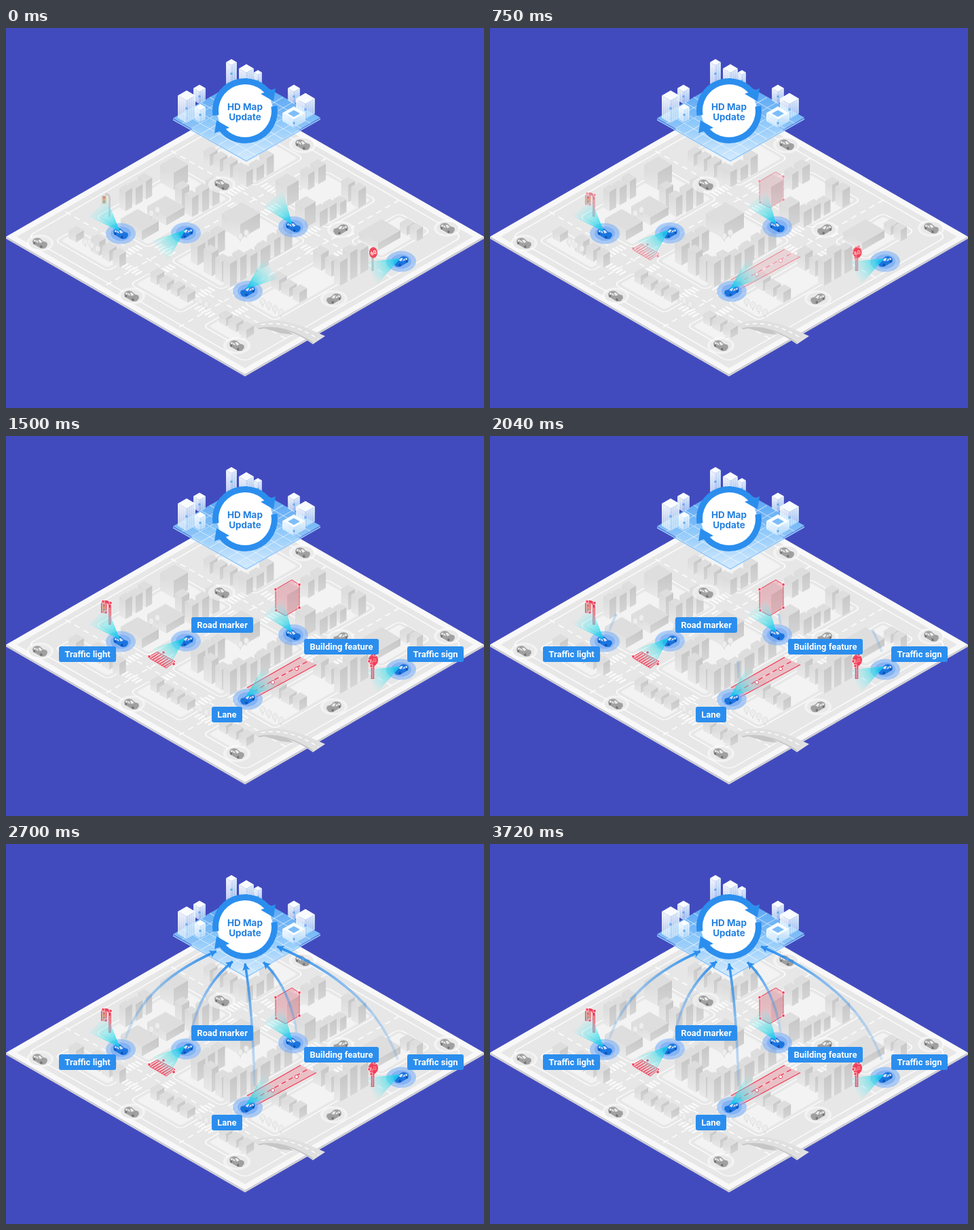
Recreate the animation shown at these times as an HTML page. Size 704x560 px, loop 3750 ms.

```html
<!DOCTYPE html>
<html lang="en">
<head>
<meta charset="utf-8">
<title>HD Map Update</title>
<style>
html, body { margin: 0; width: 100%; height: 100%; overflow: hidden; background: #424bbe; }
svg { display: block; width: 100%; height: 100%; }
.label { font: 600 13px Roboto, sans-serif; fill: #fff; text-anchor: middle; }
.title { font: 700 13.5px Inter, sans-serif; fill: #2580e0; text-anchor: middle; }
.limit { font: 700 8px Roboto, sans-serif; fill: #fff; text-anchor: middle; }
</style>
</head>
<body>
<svg id="stage" viewBox="0 0 704 560" xmlns="http://www.w3.org/2000/svg"></svg>
<script>
const LOOP = 3750;
const RED = '#f23a55';
const BLUE = '#2b8eee';
const ISO = 203 / 352;
const CONCRETE = ['#dedede', 'url(#left)', 'url(#right)'];
const GLASS = ['#f8fcff', 'url(#glassLeft)', 'url(#glassRight)'];
const UP = -1, DOWN = 1;

// Each sensing car: place, facing, view angle, upload curve and what it reports
const sensors = [
  { x: 169, y: 303, face: -1, view: 227, from: [176, 287], to: [310, 158], text: 'Traffic light', box: [78, 310, 84] },
  { x: 265, y: 302, face: 1, view: 140, from: [271, 287], to: [334, 173], text: 'Road marker', box: [273, 267, 91] },
  { x: 423, y: 293, face: -1, view: 233, from: [428, 278], to: [379, 174], text: 'Building feature', box: [439, 299, 110] },
  { x: 582, y: 344, face: 1, view: 153, from: [577, 318], to: [399, 151], text: 'Traffic sign', box: [591, 310, 83] },
  { x: 356, y: 388, face: 1, view: -39, from: [366, 357], to: [352, 176], text: 'Lane', box: [303, 399, 45] }
];

let seed = 7;
const random = (min, max) => {
  seed = (seed * 16807) % 2147483647;
  return min + (max - min) * seed / 2147483647;
};
const times = (n, fn) => Array.from({ length: n }, (_, i) => fn(i));
const draw = list => list.join('');
const polar = (r, deg) => [r * Math.cos(deg * Math.PI / 180), r * Math.sin(deg * Math.PI / 180)];

const poly = (points, attrs) => `<polygon points="${points}" ${attrs}/>`;
const path = (d, attrs) => `<path d="${d}" ${attrs}/>`;
const rect = (x, y, w, h, attrs) => `<rect x="${x}" y="${y}" width="${w}" height="${h}" ${attrs}/>`;
const oval = (x, y, rx, ry, attrs) => `<ellipse cx="${x}" cy="${y}" rx="${rx}" ry="${ry}" ${attrs}/>`;
const stop = (at, color, alpha = 1) => `<stop offset="${at}" stop-color="${color}" stop-opacity="${alpha}"/>`;
const fade = (id, ...list) => `<linearGradient id="${id}" x2="0" y2="1">${draw(list)}</linearGradient>`;

// Box given by its front bottom corner, left depth, right depth and height
function box(x, y, w, d, h, [top, left, right] = CONCRETE) {
  const l = y - w * ISO, r = y - d * ISO;
  return poly([x, y, x - w, l, x - w, l - h, x, y - h], `fill="${left}"`) +
    poly([x, y, x + d, r, x + d, r - h, x, y - h], `fill="${right}"`) +
    poly([x, y - h, x - w, l - h, x - w + d, l - d * ISO - h, x + d, r - h], `fill="${top}"`);
}

// Streets and blocks on a flat 400 x 400 square, tilted into place
function ground() {
  const line = 'fill="none" stroke="#fafafa" stroke-width="1.8"';
  const dash = `${line} stroke-dasharray="8 7"`;
  const zebra = 'fill="none" stroke="#fafafa" stroke-width="11" stroke-dasharray="3 2.6"';
  const spans = [[52, 130], [178, 252], [300, 342]];
  const rows = [[40, 64], [108, 240], [286, 358]];
  let s = rect(0, 0, 400, 400, 'fill="#f8f8f8"') + rect(9, 9, 382, 382, 'fill="#e7e7e7"') +
    rect(18, 18, 364, 364, `rx="10" ${line}`);
  for (const [a, a1] of spans) for (const [b, b1] of rows) {
    s += rect(a - 5, b - 5, a1 - a + 10, b1 - b + 10, `rx="7" ${line}`) +
      rect(a, b, a1 - a, b1 - b, 'rx="4" fill="#f3f3f3"');
  }
  for (const a of [154, 276]) for (const b of [86, 263]) {
    s += path(`M${a},14V386M14,${b}H386`, dash);
    for (const side of [-28, 28]) {
      s += path(`M${a - 14},${b + side}h28M${a + side},${b - 14}v28`, zebra);
    }
  }
  return `<g transform="matrix(.88 .5075 .88 -.5075 0 307.5)">${s}</g>`;
}

function buildings() {
  const all = [];
  const add = (...b) => all.push(b);
  // Houses of similar size side by side along a street
  const row = (x, y, n, way, height) => times(n, i =>
    add(x + 15 * i, y + 15 * ISO * way * i, random(9, 12), random(9, 12), height * random(.85, 1.15)));

  add(247, 239, 20, 21, 26);
  add(236, 291, 28, 27, 12);
  add(200, 313, 31, 25, 14);
  add(345, 311, 27, 29, 22);
  add(414, 263, 17, 17, 29);
  add(440, 295, 14, 16, 30);
  add(548, 328, 28, 33, 11);

  row(300, 204, 4, DOWN, 19);
  row(354, 235, 3, UP, 23);
  row(445, 239, 2, UP, 23);
  row(462, 294, 3, UP, 20);
  row(504, 257, 2, DOWN, 23);
  row(176, 270, 3, UP, 28);
  row(259, 270, 2, DOWN, 29);
  row(289, 272, 2, UP, 32);
  row(282, 350, 3, UP, 28);
  row(303, 366, 2, DOWN, 32);
  row(330, 382, 4, UP, 32);
  row(380, 347, 3, UP, 23);
  row(464, 358, 2, DOWN, 26);
  row(492, 380, 3, UP, 38);
  row(590, 306, 2, DOWN, 15);

  row(103, 316, 1, UP, 13);
  row(137, 336, 3, DOWN, 18);
  row(222, 379, 4, DOWN, 13);
  row(402, 388, 3, DOWN, 14);
  row(324, 440, 3, DOWN, 13);
  return draw(all.sort((p, q) => p[1] - q[1]).map(b => box(...b)));
}

const trees = (x, y, n, way) => draw(times(n, i => {
  const tx = x + 9 * i, ty = y + 9 * ISO * way * i;
  return path(`M${tx},${ty + 6}v-5`, 'stroke="#d0d0d0"') + oval(tx, ty - 2, 3.8, 4.8, 'fill="#ededed" stroke="#dadada" stroke-width=".8"');
}));

const car = (x, y, face, color, dark) => `<g transform="translate(${x} ${y}) scale(${face * .92} .88)">` +
  path('M-12,3 L-11,-1 L-5,-3 L0,-8 Q6,-10 10,-7 L12,-3 L11,1 L0,8 Q-5,10 -9,8Z', `fill="${color}"`) +
  path('M-4,-2 L0,-6 L3,-5 L0,0Z M2,0 L4,-4 L6,-5 L6,-2Z M7,-2 L7,-6 L9,-6 L10,-3Z', 'fill="#fff" opacity=".8"') +
  oval(-2, 6, 1.8, 2.4, `fill="${dark}"`) + oval(9, 0, 1.5, 2.2, `fill="${dark}"`) + '</g>';

const parked = ([x, y, face = -1]) => oval(x, y, 20, 12.5, 'fill="#fff" opacity=".5"') +
  oval(x, y, 16, 9.5, 'fill="#e9e9e9"') + car(x, y, face, '#a0a0a0', '#747474');
const active = ({ x, y, face }) => oval(x, y, 22, 15.5, 'fill="#7db2fb" opacity=".6"') +
  oval(x, y, 15, 10.5, 'fill="#639ff5" opacity=".5"') + car(x, y, face, '#1b74de', '#0f52b0');

function cone({ x, y, view }) {
  const ends = [-21, 21].map(side => polar(50, view + side));
  const [p, q] = ends;
  return `<g transform="translate(${x - 2} ${y - 4})">` + poly([0, 0, ...p, ...q], 'fill="url(#beam)"') +
    path(`M${p}L0,0L${q}`, 'fill="none" stroke="url(#beam)"') + '</g>';
}

function city() {
  const street = 'stroke="#fff" stroke-width="1.2" opacity=".45"';
  let s = poly('246,134 354,195 463,133 463,135 354,197 246,136', 'fill="#8fcaff"') +
    poly('246,133 354,71 463,132 354,195', 'fill="url(#plate)"');
  for (let k = 13.5; k < 100; k += 13.5) {
    s += path(`M${246 + k},${133 - k * ISO}l108,62M${246 + k},${133 + k * ISO}l108,-62`, street);
  }
  const tower = (x, y, w, h) => {
    let lines = '';
    for (let k = 3; k < w; k += 3) lines += `M${x - k},${y - k * ISO}v${-h}M${x + k},${y - k * ISO}v${-h}`;
    s += box(x, y, w, w, h, GLASS) + path(lines, 'stroke="#fff" stroke-width=".8" opacity=".6"') +
      rect(x - 1.5, y - h * .7, 3, 3, 'fill="#5cacf6"');
  };
  tower(332, 91, 8, 36);
  tower(354, 92, 11, 26);
  tower(371, 94, 6, 25);
  tower(285, 112, 9, 18);
  tower(266, 140, 13, 33);
  tower(286, 139, 8, 18);
  tower(424, 112, 9, 18);
  tower(441, 134, 14, 22);
  tower(424, 147, 17, 12);
  return s + poly('415,126 424,121 433,126 424,131', 'fill="#7cbef8"');
}

const stroke = (color, width) => `fill="none" stroke="${color}" stroke-width="${width}"`;

function highlights() {
  const line = stroke(RED, 1.4);
  const tint = `fill="${RED}" fill-opacity=".22" stroke="${RED}"`;
  const dots = (...list) => draw(list.map(([x, y]) => rect(x - 2, y - 2, 4, 4, `fill="${RED}" stroke="#fff" stroke-width=".7"`)));
  const stripes = draw(times(7, i => `M${212.4 + i * 3.4},${328 + i * 2}l13,-8`));
  const lane = poly('355,371 434,326 457,337 368,385', `fill="${RED}" fill-opacity=".22"`) +
    path('M355,371L434,326M368,385L457,337', line) +
    path('M364,377L444,332', `${line} stroke-dasharray="7 5"`) +
    draw([[393, 363], [428, 343]].map(p => oval(...p, 2.6, 2.6, `fill="#fff" stroke="${RED}"`)));
  const marker = poly('209,326 223,318 249,332 236,342', tint) + path(stripes, line) + dots([211, 325], [232, 319], [247, 336]);
  const wall = poly('397,226 421,212 432,219 432,253 412,265 397,257', tint) +
    dots([397, 226], [432, 219], [432, 253], [398, 257]);
  const light = path('M153,278V252Q153,243 145,244', stroke(RED, 3.4)) + path('M153,277V253', stroke('#ffb1bb', 1.2)) +
    rect(140.5, 246, 7.5, 14, tint) + dots([143, 244], [154, 246], [147, 260]);
  const sign = path('M540,338V358', stroke(RED, 4.6)) + path('M540,341V357', stroke('#ff9daa', 1.4)) +
    oval(541, 330, 6.5, 8, `fill="${RED}" fill-opacity=".6" stroke="${RED}"`) + dots([543, 322], [535, 332], [538, 339]);
  return lane + marker + wall + light + sign;
}

const roadside = () => path('M152.5,278V250Q152,244 146,245', stroke('#c9c9c9', 2.6)) +
  rect(141.5, 247, 6, 12, 'fill="#c8b9ac"') +
  draw(['#e06a5f', '#e0b45f', '#86b27f'].map((c, i) => oval(144.5, 250 + 3 * i, 1.3, 1.3, `fill="${c}"`))) +
  path('M540,337V358', stroke('#bcbcbc', 3)) + oval(541, 331, 6, 8, 'fill="#ee4a5c"') +
  '<text class="limit" x="541" y="334" transform="rotate(-20 541 331)">60</text>';

const ramp = () => path('M372,440C392,436 408,441 424,452L405,450Z', 'fill="#c6c6c6"') +
  path('M362,437C395,426 420,430 470,454L452,466C424,446 400,438 372,444Z', 'fill="#e0e0e0"') +
  path('M372,443C400,438 424,446 452,464', stroke('#c6c6c6', 2)) +
  path('M376,437C405,432 430,440 460,458', stroke('#fff', 1.4) + ' stroke-dasharray="6 5"');

const label = ({ text, box: [x, y, w] }) => rect(x, y, w, 23, `rx="3" fill="${BLUE}"`) +
  `<text class="label" x="${x + w / 2}" y="${y + 16}">${text}</text>`;

// Curve from a car to the city, uncovered by its mask
function upload({ from: [x, y], to: [x1, y1] }, i) {
  const cx = x + .2 * (x1 - x), cy = y + .64 * (y1 - y);
  const d = `M${x},${y}Q${cx},${cy} ${x1},${y1}`;
  const turn = Math.atan2(y1 - cy, x1 - cx) * 180 / Math.PI;
  return `<linearGradient id="up${i}" gradientUnits="userSpaceOnUse" x1="${x}" y1="${y}" x2="${x1}" y2="${y1}">` +
    stop(0, BLUE, .15) + stop(.5, BLUE, .46) + stop(1, BLUE) + '</linearGradient>' +
    `<mask id="mask${i}" maskUnits="userSpaceOnUse" x="0" y="0" width="704" height="560">` +
    path(d, `class="reveal" pathLength="1" ${stroke('#fff', 18)}`) + '</mask>' +
    `<g mask="url(#mask${i})">` + path(d, stroke(`url(#up${i})`, 3.6)) +
    path('M0,0L-10,-5.5L-8,0L-10,5.5Z', `fill="${BLUE}" transform="translate(${x1} ${y1}) rotate(${turn})"`) + '</g>';
}

function ring() {
  const half = path(`M${polar(43.5, -9)}A43.5,43.5 0 0 1 ${polar(43.5, 148)}`, stroke(BLUE, 9)) +
    poly('-42,14 -23,25 -45,33', `fill="${BLUE}"`);
  return half + `<g transform="rotate(180)">${half}</g>`;
}

const parking = [[437, 172], [318, 231], [50, 317], [185, 395], [340, 468], [483, 399, 1], [493, 297, 1], [650, 295]];
const stage = document.getElementById('stage');
stage.innerHTML = '<defs>' +
  fade('left', stop(0, '#dadada'), stop(1, '#eaeaea')) +
  fade('right', stop(0, '#c6c6c6'), stop(1, '#d6d6d6')) +
  fade('glassLeft', stop(0, '#f6fbff', .95), stop(1, '#d2e9fd', .7)) +
  fade('glassRight', stop(0, '#dfeefc', .95), stop(1, '#b4dafb', .7)) +
  fade('plate', stop(0, '#4fa2f5', .95), stop(.5, '#7fc2fa', .95), stop(1, '#d3eafe', .93)) +
  '<radialGradient id="beam" gradientUnits="userSpaceOnUse" cx="0" cy="0" r="50">' +
  stop(0, '#12c4ea', .95) + stop(.4, '#35dcea', .6) + stop(1, '#8defef', .08) + '</radialGradient></defs>' +
  rect(0, 0, 704, 560, 'fill="#424bbe"') +
  poly('0,307.5 352,510.5 704,307.5 704,310.5 352,513.5 0,310.5', 'fill="#d2d2d2"') +
  ground() + ramp() + buildings() +
  trees(214, 275, 2, UP) + trees(117, 317, 3, DOWN) + trees(345, 309, 2, UP) + trees(378, 405, 4, DOWN) + trees(286, 404, 2, DOWN) +
  draw(parking.map(parked)) + roadside() +
  `<g id="found">${highlights()}</g>` +
  draw(sensors.map(active)) + draw(sensors.map(cone)) +
  city() + draw(sensors.map(upload)) +
  oval(352, 122, 41, 41, 'fill="#fff"') + `<g id="ring">${ring()}</g>` +
  '<text class="title" x="352" y="121">HD Map</text><text class="title" x="352" y="135.5">Update</text>' +
  `<g id="labels">${draw(sensors.map(label))}</g>`;

const [found, labels, wheel] = ['found', 'labels', 'ring'].map(id => document.getElementById(id));
const reveals = stage.querySelectorAll('.reveal');

const span = (t, from, to) => Math.min(1, Math.max(0, (t - from) / (to - from)));
const sine = k => .5 - .5 * Math.cos(Math.PI * k);

function update(t) {
  // Three fades: in, out, in
  found.setAttribute('opacity', sine(3 * span(t, 0, 900)));

  const show = span(t, 1200, 1500);
  labels.setAttribute('opacity', show);
  labels.setAttribute('transform', `translate(${14 * (1 - show) ** 2} 0)`);

  const sent = sine(span(t, 1830, 2700));
  for (const r of reveals) {
    r.setAttribute('stroke-dasharray', `${sent} 2`);
    r.setAttribute('visibility', sent > 0 ? 'visible' : 'hidden');
  }

  const turn = 360 * sine(span(t, 2850, 3720));
  wheel.setAttribute('transform', `translate(352 122) rotate(${turn})`);
}

const start = performance.now();
function tick() {
  update((performance.now() - start) % LOOP);
  requestAnimationFrame(tick);
}
update(0);
requestAnimationFrame(tick);
</script>
</body>
</html>
```
